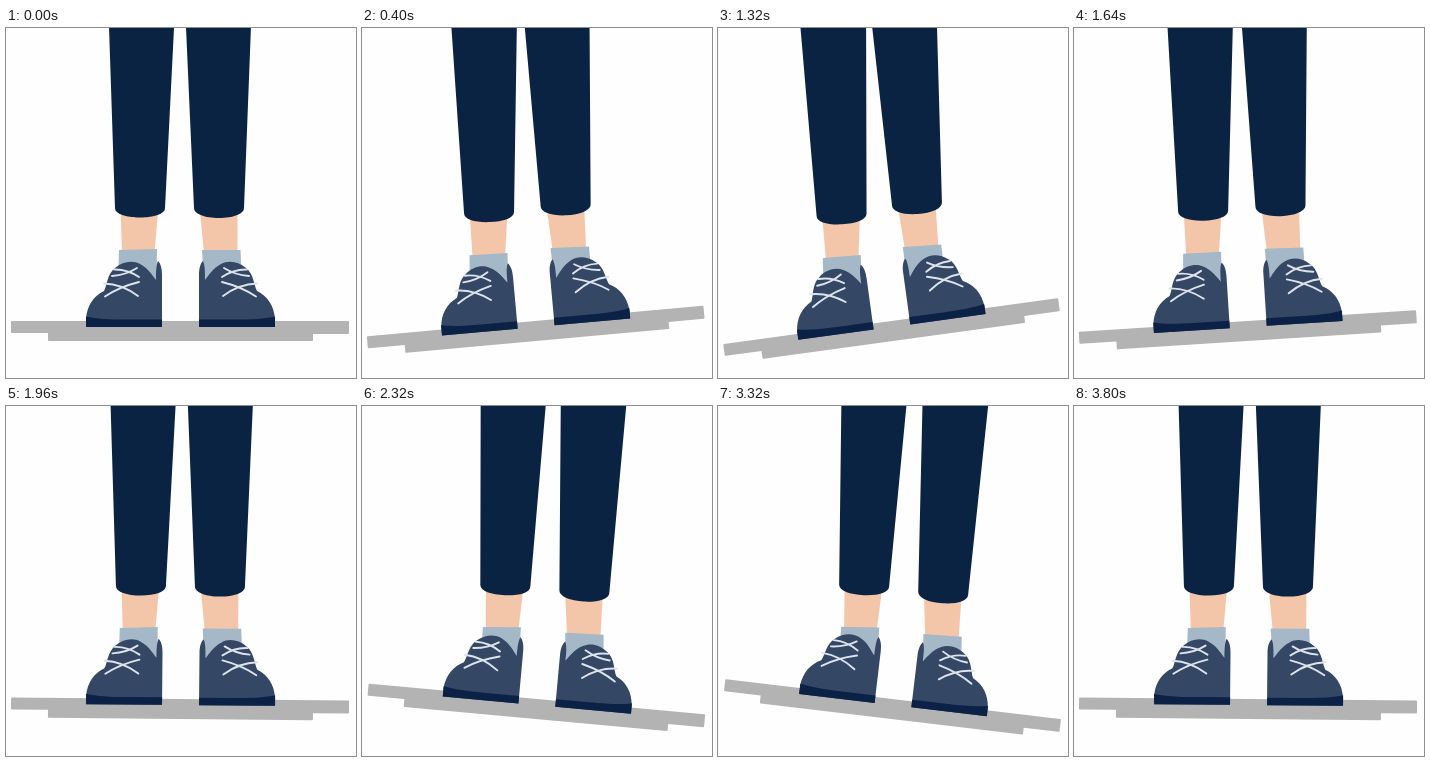
Animation, 350 px wide and 350 px high, one loop 3840 ms. Source, as an HTML page:

```html
<!DOCTYPE html>
<html lang="en">
<head>
<meta charset="utf-8">
<title>Balance board</title>
<style>
  html, body { margin: 0; width: 100%; height: 100%; overflow: hidden; background: #fefefe; }
  svg { display: block; width: 100vw; height: 100vh; }
  .board { fill: #b3b3b3; }
  .cloth { fill: #0b2343; }
  .skin { fill: #f4c6a9; }
  .sock { fill: #a4b8c8; }
  .upper { fill: #344764; }
  .sole { fill: #0b2146; }
  .lace { fill: none; stroke: #dde3ec; stroke-width: 1.9; stroke-linecap: round; }
</style>
</head>
<body>
<svg viewBox="0 0 350 350" xmlns="http://www.w3.org/2000/svg">
  <defs>
    <g id="shoe">
      <path class="upper" d="M80 299V291C81 277 88 268 98 263C101 258 101 246 109 240C117 233 127 232 134 236C142 240 146 247 150 252C150 244 150 237 152 233C155 236 156 241 156 247V299Z"/>
      <path class="sole" d="M80 299V288.500C90 291 105 291.500 120 291.500H156V299Z"/>
      <path class="lace" d="M108 241.500Q121 241 133 249M106 248Q120 247 131 240M98 255.500Q116 256 132 268M99 268.500Q113 259 133 254"/>
    </g>
  </defs>

  <g id="board">
    <path class="board" d="M6 293H342Q343 293 343 294V305Q343 306 342 306H307V312Q307 313 306 313H43Q42 313 42 312V305H6Q5 305 5 304V294Q5 293 6 293Z"/>
  </g>

  <g id="left">
    <path class="skin" d="M114.500 178H152.500L148.500 225H116Z"/>
    <path class="sock" d="M113 222L151 221L150.500 256H112Z"/>
    <path class="cloth" d="M100.400 -80L109 180C109 186 120 189.500 134 189.500S159 186 159 180L172 -80Z"/>
  </g>
  <g id="right">
    <path class="skin" d="M193.500 178H231.500V225H198Z"/>
    <path class="sock" d="M196 222H234.500L236 256H198Z"/>
    <path class="cloth" d="M176.500 -80L188 180C188 186 199 190 213 190S238 186 238 180L248 -80Z"/>
  </g>

  <g id="shoes">
    <use href="#shoe"/>
    <use href="#shoe" transform="translate(349 0) scale(-1 1)"/>
  </g>
</svg>
<script>
  const LOOP = 3840, STEP = 40, TILT = 12.5;
  const get = id => document.getElementById(id);
  const board = get('board'), shoes = get('shoes');

  // Shift and turn of each trouser hem at full tilt to either side.
  const legs = [
    { el: get('left'), x: 134, y: 182, neg: [-16.5, 11, -4.8], pos: [22.2, -0.5, 4.8] },
    { el: get('right'), x: 213, y: 182, neg: [-22.2, -6.3, -6.1], pos: [22.2, 13.5, 7.1] }
  ];

  // Triangle wave: 0, -1, 0, 1, 0
  function swing(p) {
    if (p < 0.25) return -4 * p;
    if (p < 0.75) return 4 * p - 2;
    return 4 - 4 * p;
  }

  function draw(ms) {
    const t = Math.floor((ms % LOOP) / STEP) * STEP;
    const s = swing(t / LOOP);
    const tilt = `rotate(${s * TILT} 174 303)`;
    board.setAttribute('transform', tilt);
    shoes.setAttribute('transform', tilt);
    for (const { el, x, y, neg, pos } of legs) {
      const [dx, dy, turn] = (s < 0 ? neg : pos).map(v => v * Math.abs(s));
      el.setAttribute('transform', `translate(${dx} ${dy}) rotate(${turn} ${x} ${y})`);
    }
  }

  let start;
  function tick(now) {
    start ??= now;
    draw(now - start);
    requestAnimationFrame(tick);
  }
  draw(0);
  requestAnimationFrame(tick);
</script>
</body>
</html>
```
